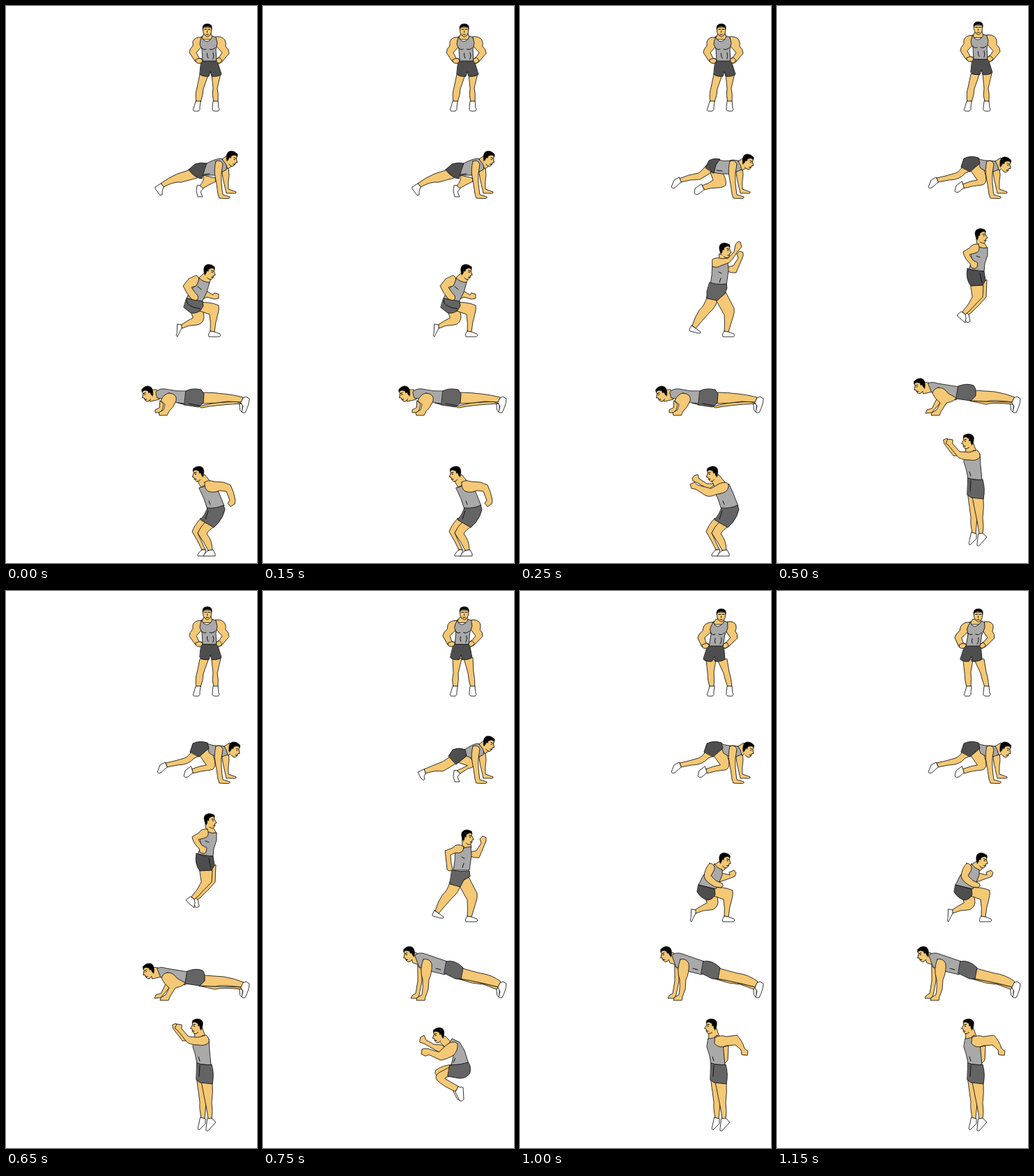
These frames come from a looping animation (360 px wide and 800 px high, 1.25 s). An HTML page:

```html
<!DOCTYPE html>
<html lang="en">
<head>
<meta charset="utf-8">
<title>Workout</title>
<style>
html,body{margin:0;width:100%;height:100%;overflow:hidden;background:#fff}
svg{display:block;width:360px;height:800px}
path{fill:#f4c874;stroke:#111;stroke-width:.85;stroke-linejoin:round;stroke-linecap:round}
.t{fill:#a9a9a9}
.k{fill:#4e4e4e}
.m{fill:#646464}
.w{fill:#fff}
.h{fill:#000;stroke-width:.4}
.l{fill:none;stroke-width:1}

/* A loop has five beats: the number gives how many a part stays, --s its first beat. */
.n1,.n2,.n3,.n4,.alt{animation:one 1250ms step-end infinite;animation-delay:calc((var(--s) - 5)*250ms)}
.n2{animation-name:two}
.n3{animation-name:three}
.n4{animation-name:four}
.alt{animation-name:alternate}
.s0{--s:0}.s1{--s:1}.s2{--s:2}.s3{--s:3}.s4{--s:4}
@keyframes one{0%{visibility:visible}20%,to{visibility:hidden}}
@keyframes two{0%{visibility:visible}40%,to{visibility:hidden}}
@keyframes three{0%{visibility:visible}60%,to{visibility:hidden}}
@keyframes four{0%{visibility:visible}80%,to{visibility:hidden}}
@keyframes alternate{0%,40%{visibility:visible}20%,60%,to{visibility:hidden}}
</style>
</head>
<body>
<svg viewBox="0 0 360 800">
<defs>
  <g id="side">
    <path d="M4 17V8L13 3Q16 5 15.500 9L18.500 14 16 15 16.300 18 14 21.500Q11 22.500 8 20"/>
    <path class="h" d="M1 11Q-1 4 4 1.500 9-1 15 2.500L16 6Q12 4 10 6L7.500 7.500V11L5.500 10.500 5 15 3 16Z"/>
    <path class="l" d="M11.500 8.500L14.500 9M12.500 11h1.500M13.500 18L16 17.500"/>
  </g>
  <g id="front">
    <path d="M1 6L1.500 13Q3 18 7.500 19.500 12 18 13 13L13.500 6Z"/>
    <path class="h" d="M1 9Q-1 .5 7.500 .5 15.500 .5 13.800 9L12.500 5.500Q7 3.500 2.500 5.500Z"/>
    <path class="l" d="M3.500 8.500H6.500M8.500 8.500H11.500M7.300 11v2M5.500 16h3.500"/>
  </g>
  <g id="trunk">
    <path d="M283 41L282 44Q278 45 275 48L303 48Q299 45 295 43L294 39Z"/>
    <path d="M280 45Q271 44 268 51L268 57Q263 62 263 67L271 79Q277 84 281 80L281 76 277 75 273 67 280 59Z"/>
    <path d="M301 44Q310 43 314 49 316 54 315 58 320 62 320 68L310 80Q305 84 303 81L302 76 306 73 310 67 302 58Z"/>
    <path class="t" d="M281 44Q282 50 288 51 294 50 296 43L301 45 303 53 301 63 302 80H282L281 62 278 55Q278 49 281 44Z"/>
    <path class="l" d="M280 60Q284 64 287 62M292 62Q296 64 300 60M288.500 68Q288 72 290 75M297 67Q299 72 297 76"/>
    <path class="k" d="M280 79H303L309 98Q304 102 295 101L293 94 291 101Q282 102 278 98Z"/>
    <path d="M272 77L277 75 282 77 281 81Q277 84 273 81ZM302 76L306 74 310 78 307 82Q304 83 302 80Z"/>
  </g>
  <path id="heel" class="w" d="M228 246L221 250 217 260Q219 263 222 261L231 253Z"/>
</defs>

<!-- Hip circles -->
<g class="n3 s0">
  <path d="M278 98L274 117Q271 126 273 138H279Q283 127 283 119L290 99Z"/>
  <path d="M295 98L297 118Q295 128 298 138H304Q305 126 303 118L308 97Z"/>
</g>
<g class="n1 s3">
  <path d="M272 96L273 118Q270 128 273 138H279Q281 126 280 118L285 97Z"/>
  <path d="M288 97L294 118Q295 130 298 138H304Q304 126 302 116L301 96Z"/>
</g>
<g class="n1 s4">
  <path d="M267 99L269 118Q269 128 272 138H278Q279 126 278 116L281 99Z"/>
  <path d="M283 99L292 118Q294 128 298 138H304Q303 124 300 116L297 98Z"/>
</g>
<path class="w" d="M272 137L269 147Q267 151 271 151L276 151Q279 149 278 145L279 137ZM297 137L296 146Q295 151 300 151H304Q307 150 305 146L304 137Z"/>
<use class="n2 s0" href="#trunk"/>
<use class="n1 s2" href="#trunk" y="-2.500"/>
<use class="n1 s3" href="#trunk" transform="matrix(1 0 -.135 1 4 -2.500)"/>
<use class="n1 s4" href="#trunk" transform="matrix(1 0 -.22 1 6.600 0)"/>
<use class="n3 s4" href="#front" x="281.300" y="25"/>
<use class="n2 s2" href="#front" x="281.300" y="22"/>

<!-- Mountain climber -->
<path d="M313 232L319 231 320 243Q318 255 319 263L330 267Q331 270 325 269H316L314 260Q311 248 310 240Z"/>
<g class="n1 s0">
  <path d="M268 234L246 241Q232 247 222 255L226 260Q240 252 252 253L274 247Z"/>
  <path class="w" d="M222 255L214 260Q213 262 216 265L221 272 224 271V266L226 260Z"/>
  <path d="M283 243L300 247 301 252Q290 257 282 262L278 258Q285 251 283 243Z"/>
</g>
<g class="n1 s3">
  <path d="M268 238Q258 246 250 248L231 256 233 262Q248 257 258 259L278 247Z"/>
  <path class="w" d="M231 256L222 260 226 268 230 272 232 270 231 266 233 262Z"/>
  <path d="M280 246L293 236Q302 243 303 250 301 254 294 255L283 262 278 258Q287 254 293 251Z"/>
</g>
<path class="w alt s3" d="M278 258L283 262 279 267 282 274 275 274 273 266 274 258Z"/>
<g class="n1 s1">
  <path d="M267 229Q262 236 256 240L242 243 228 248 231 253Q245 249 258 249L275 239Z"/>
  <path d="M273 239L277 250Q271 255 261 258L264 264Q274 261 283 261 292 261 295 257 297 250 290 238Z"/>
  <path class="w" d="M260 256L251 262 250 269Q252 272 256 270L264 264Z"/>
</g>
<g class="alt s2">
  <path d="M266 230Q262 238 256 240L242 244 229 247 231 253 246 250Q262 250 270 240L277 237Z"/>
  <path d="M278 236L291 225Q300 238 300 250 299 256 294 257 280 258 268 262L266 256Q278 251 287 250Z"/>
  <path class="w" d="M265 252L257 258 255 266Q257 269 261 267L268 261Z"/>
</g>
<use class="n2 s1" href="#heel"/>
<use class="n1 s4" href="#heel"/>
<g class="n1 s0">
  <path class="t" d="M286 227Q298 220 308 219L318 222 316 235 301 243H281Z"/>
  <path class="k" d="M262 235L271 227Q279 224 288 226L285 234 281 248Q270 247 262 235Z"/>
  <path class="l" d="M284 242L292 241"/>
</g>
<g class="n1 s1">
  <path class="t" d="M285 221Q295 224 305 221L319 223 318 235 303 241Q290 242 276 239Z"/>
  <path class="k" d="M266 232L271 222Q277 218 287 220L281 228 278 240Z"/>
  <path class="l" d="M282 236L290 237"/>
</g>
<g class="alt s2">
  <path class="t" d="M288 219Q298 223 306 222L319 224 318 235 304 240 292 233Z"/>
  <path class="k" d="M264 231L268 219Q278 214 289 218L291 226 277 238Z"/>
</g>
<g class="n1 s3">
  <path class="t" d="M289 228Q300 220 308 219L318 222 316 235 303 242 290 236Z"/>
  <path class="k" d="M266 237L272 228Q281 224 290 228L292 237 277 249Z"/>
</g>
<g class="alt s3">
  <path d="M310 220L318 214 325 229 318 234Q316 226 310 220Z"/>
  <use href="#side" transform="translate(319 205.500) rotate(20)"/>
</g>
<path id="nape" class="n2 s1" d="M313 223L321 218 328 231 318 236Q317 228 313 223Z"/>
<path class="n1 s4" d="M313 223L321 218 328 231 318 236Q317 228 313 223Z"/>
<use class="n1 s1" href="#side" transform="translate(322 210) rotate(20)"/>
<use class="alt s2" href="#side" transform="translate(322.500 214) rotate(20)"/>
<path d="M301 223Q308 220 311 227L309 240Q308 252 311 271L321 274Q322 277 316 276.500L306 276 304 270Q302 255 300 245 298 235 301 223Z"/>

<!-- Jumping lunge -->
<g class="n2 s4">
  <path d="M266 440L283 437 284 448Q282 457 274 458 262 458 252 463L251 458Q260 452 268 448Z"/>
  <path class="w" d="M246 457L252 458V463Q247 472 246 475 243 474 245 470Z"/>
  <path d="M272 426Q292 424 305 430 306 436 304 442 300 455 299 468H293Q294 455 292 443L278 438Z"/>
</g>
<g class="n1 s0">
  <path d="M287 409L297 415 299 412 305 414V420L299 421 288 418 280 422Z"/>
  <path d="M277 390L286 382 294 392 291 399 278 397Z"/>
  <path class="t" d="M277 391Q284 397 292 397L288 411 281 425 259 420 265 407Q274 402 277 391Z"/>
  <path class="m" d="M259 420L282 424 283 431 279 437Q274 442 265 441L255 433Z"/>
  <path class="l" d="M275 403L280 407M259 422Q258 432 279 435"/>
  <path d="M273 387Q278 389 276 395L273 402 266 404Q270 411 275 416 277 421 272 423L266 421Q258 412 254 402L262 392Z"/>
  <use href="#side" transform="translate(285 369) rotate(12)"/>
</g>
<g class="n1 s4">
  <path d="M289 405L301 408 300 404 307 401 310 405 308 410 300 413 286 418Z"/>
  <path d="M279 393L288 387 296 397 291 402 281 399Z"/>
  <path class="t" d="M279 392Q284 399 290 400V408L285 420 281 428 256 422 263 408Q272 402 279 392Z"/>
  <path class="k" d="M256 422L279 428 280 436Q276 444 268 444 258 440 254 432Z"/>
  <path d="M272 391Q280 392 279 400L274 409 281 416 290 420Q293 424 288 426L280 425Q266 418 264 410 265 398 272 391Z"/>
  <use href="#side" transform="translate(287 374) rotate(12)"/>
</g>
<g class="alt s1">
  <path d="M268 418L284 421Q280 434 272 440 262 451 252 463L247 459Q251 446 257 437 265 430 268 418Z"/>
  <path class="w" d="M246 459L252 463 259 468Q259 471 256 470L244 467Q241 466 246 459Z"/>
  <path d="M280 420L295 411 307 434Q308 440 306 445L299 468H293Q294 456 293 444Z"/>
  <path d="M298 375L306 373 313 362 311 356 315 352 320 354V359L315 371 310 383Q304 384 297 381Z"/>
  <path d="M286 356L297 360 299 368Q292 374 286 367Z"/>
  <path class="t" d="M276 374Q285 377 288 369L298 367 299 380 296 401H273L275 387Z"/>
  <path class="l" d="M285 382L289 384M288 391L286 397"/>
</g>
<path class="m n1 s1" d="M272 397Q284 401 296 399L297 405 294 413 283 423 268 420V410Z"/>
<path class="m n1 s3" d="M271 401Q284 404 296 402L297 410 288 415 283 425 268 421Z"/>
<use class="n1 s1" href="#side" transform="translate(286 339) rotate(5)"/>
<use class="n1 s3" href="#side" transform="translate(284.500 342) rotate(3)"/>
<path class="n1 s1" d="M276 364Q282 360 290 363L299 362 307 353 309 343Q312 337 316 339L318 346 311 354Q304 366 299 369L288 373Q282 377 276 374Z"/>
<path class="n1 s3" d="M288 367Q278 361 272 369L261 373 263 390 264 400Q268 404 272 400L270 391 269 379 276 376Q288 378 288 367Z"/>
<path class="w n4 s3" d="M293 467L299 468 307 471Q309 475 305 475H291Q289 472 293 467Z"/>
<g class="n1 s2">
  <path d="M292 398L301 393 300 418Q290 430 279 440L274 444 270 440 285 420Z"/>
  <path class="w" d="M270 440L275 443 277 453 273 455 269 450Z"/>
  <path d="M278 401H296L295 418Q285 428 276 438L270 443 266 439Q276 428 280 418Z"/>
  <path class="w" d="M264 439L258 444Q259 446 264 450L270 455 271 448 270 443Z"/>
  <path d="M286 334L296 338 302 348Q294 352 288 347Z"/>
  <path class="t" d="M278 355Q288 355 290 346 296 349 302 347V358L298 370 297 381 275 378 280 366Z"/>
  <path class="k" d="M273 377Q285 382 297 381L299 394 295 401 278 402Q270 392 273 377Z"/>
  <path class="l" d="M286 359L291 361M291 384L294 398"/>
  <path d="M289 342Q280 341 277 347L267 353Q268 362 277 370L278 375Q284 379 287 375L288 369 281 365 276 357 284 355Q293 353 289 342Z"/>
  <use href="#side" x="283.500" y="319"/>
</g>

<!-- Push-up -->
<path class="w" d="M335 571L339 570V584L336 581Z"/>
<g class="n2 s0">
  <path d="M221 567L226 572 224 580 221 584H214L214 580 220 577Z"/>
  <path d="M276 575L300 570 330 568 338 571Q300 573 281 577Z"/>
  <path d="M283 555Q298 555 312 557 325 558 340 562L338 569 318 568Q300 571 282 571Z"/>
  <path d="M204 551L216 551 220 565 207 568Z"/>
  <path class="t" d="M215 554Q220 549 228 550 245 554 260 553L257 573 243 569 229 565 217 563Z"/>
  <path class="m" d="M258 553Q266 548 280 551L284 557 283 570 276 576 256 573Z"/>
  <path class="l" d="M247 570L255 571M262 571L277 574"/>
  <path d="M234 556Q246 557 244 567 240 577 234 582L231 588H220L219 584 226 580 228 572 222 567Q226 557 234 556Z"/>
  <use href="#side" transform="translate(207.500 543) scale(-1 1) rotate(22)"/>
</g>
<g class="n1 s2">
  <path d="M229 565L234 570 222 584 213 585 215 580 222 578Z"/>
  <path d="M277 567L300 568 338 569V572Q310 569 300 572Z"/>
  <path d="M284 552L312 554Q326 556 341 562L338 569Q310 565 300 568L277 567Z"/>
  <path d="M206 540L218 541 223 554 210 557Z"/>
  <path class="t" d="M217 542Q222 539 230 542L261 547 257 566 240 561 222 555Z"/>
  <path class="m" d="M260 546Q272 541 282 545 286 549 285 560L278 567 257 564Z"/>
  <path d="M232 548Q240 548 245 556L257 563Q254 568 243 570L235 583 233 588H221L222 584 229 580 234 570Q226 564 223 556 225 549 232 548Z"/>
  <use href="#side" transform="translate(209.500 532) scale(-1 1) rotate(20)"/>
</g>
<g class="n2 s3">
  <path d="M222 538L228 545V560L224 580 222 585H212L214 581 219 578 222 560Z"/>
  <path d="M276 556L300 560 338 569 335 572 316 565 300 563Z"/>
  <path d="M286 542Q300 546 312 549 328 551 341 561L338 569 318 564Q300 560 284 557Z"/>
  <path d="M211 518L221 520 226 538 215 534Z"/>
  <path class="t" d="M218 523Q224 518 232 521L264 532 261 551 240 546 224 540Z"/>
  <path class="m" d="M263 532Q275 529 287 541L284 557 276 557 260 549Z"/>
  <path class="l" d="M248 542L255 544"/>
  <path d="M230 529Q238 527 242 535 243 548 238 558L237 572 233 583 232 588H220L221 584 228 580Q230 568 229 558 224 544 230 529Z"/>
  <use href="#side" transform="translate(215 508) scale(-1 1) rotate(18)"/>
</g>
<path class="w" d="M340 563L344 561 349 564Q349 572 343 584 339 585 338 583L340 575 337 570Z"/>

<!-- Squat jump -->
<g class="n2 s0">
  <path d="M279 736L290 742Q278 750 275 757L286 781H281Q275 768 267 755 270 746 279 736Z"/>
  <path class="w" d="M281 781H287L284 790H275Q274 787 281 781Z"/>
  <path d="M286 741L300 747Q290 753 288 758 296 768 296 782H290Q284 770 275 757 278 749 286 741Z"/>
  <path class="w" d="M290 782L297 781 300 787 300 790H283Q284 786 290 782Z"/>
</g>
<path class="n1 s1" d="M281 686L268 686 257 679 255 673 251 674 247 678 248 682 255 685 270 694Z"/>
<g class="n2 s0">
  <path d="M274 680L285 673 294 684 280 691Z"/>
  <path class="t" d="M277 692Q288 690 292 684L300 687 305 698 313 718Q300 723 289 723L284 708Z"/>
  <path class="m" d="M289 721Q302 722 312 717L314 723Q312 733 305 742L298 749 279 738Q286 730 289 721Z"/>
  <path class="l" d="M291 711L293 716M290 725L286 737"/>
  <use href="#side" transform="translate(282.500 659) scale(-1 1) rotate(12)"/>
</g>
<path class="n1 s0" d="M285 684Q290 680 298 683L312 684 322 688Q327 698 329 710L328 715 322 719 318 714 321 710 316 697 306 696Q298 700 290 697 284 693 285 684Z"/>
<path class="n1 s1" d="M299 687Q296 682 286 686L274 693 255 688 250 684 244 687 246 693 252 694 266 703Q272 706 280 702L292 699Q300 696 299 687Z"/>
<path class="n1 s2" d="M239 623L244 621 247 627 259 646 253 646 240 629Z"/>
<path class="n1 s4" d="M291 655L299 653 298 674 293 679Z"/>
<g class="alt s2">
  <path d="M274 702L286 706 287 735 285 758 280 757Q277 742 278 735Z"/>
  <path class="w" d="M279 756L286 758V765L277 774Q274 774 276 768Z"/>
  <path d="M280 705L296 706Q297 722 295 735 297 748 295 758L290 759Q289 750 287 740 283 720 280 705Z"/>
  <path class="w" d="M289 758L295 757 301 763 290 775Q286 777 287 772Z"/>
  <path d="M271 633L281 626 286 640 271 645Z"/>
  <path class="t" d="M270 643Q279 643 282 638L291 643 292 660 294 681 274 679Q272 665 268 655Z"/>
  <path class="m" d="M274 678Q285 682 295 680 299 694 296 708L278 706 273 702Z"/>
  <path class="l" d="M276 669L278 675M278 681L277 697"/>
  <use href="#side" transform="translate(282.500 613.500) scale(-1 1) rotate(3)"/>
</g>
<path class="n1 s2" d="M287 638Q292 642 291 648 286 654 276 652 262 652 258 646L246 631 242 628 245 622 252 623V629L262 640 275 641Z"/>
<path class="n1 s4" d="M280 641Q287 637 296 640L311 638Q319 646 322 657L327 661 326 667 318 666 317 659 309 652 296 653Q286 658 279 650Z"/>
<g class="n1 s3">
  <path d="M226 641L231 638 234 645 245 651 256 652 262 656 252 662 231 650 225 648Z"/>
  <path d="M273 680L264 690 250 697Q245 693 248 688 258 681 273 680Z"/>
  <path class="w" d="M273 718L278 714 284 732 279 730Z"/>
  <path d="M268 684V697Q258 699 262 701L281 712 276 719Q258 711 250 703 245 698 252 692Z"/>
  <path class="w" d="M280 712L287 713 288 730Q286 734 282 732L276 720Z"/>
  <path d="M252 646L261 639 270 648 262 655Z"/>
  <path class="t" d="M263 653Q268 649 271 643L282 648 289 660 295 679 270 681 273 668Z"/>
  <path class="m" d="M268 681Q282 681 294 677 299 682 297 692 292 700 282 700L265 697Z"/>
  <path class="l" d="M276 671L273 677"/>
  <path d="M262 653Q272 644 279 650 280 660 273 667 265 672 255 674L238 666 233 668 227 665 228 658 235 657 252 662Z"/>
  <use href="#side" transform="translate(258.500 625) scale(-1 1) rotate(12)"/>
</g>
</svg>
</body>
</html>
```
